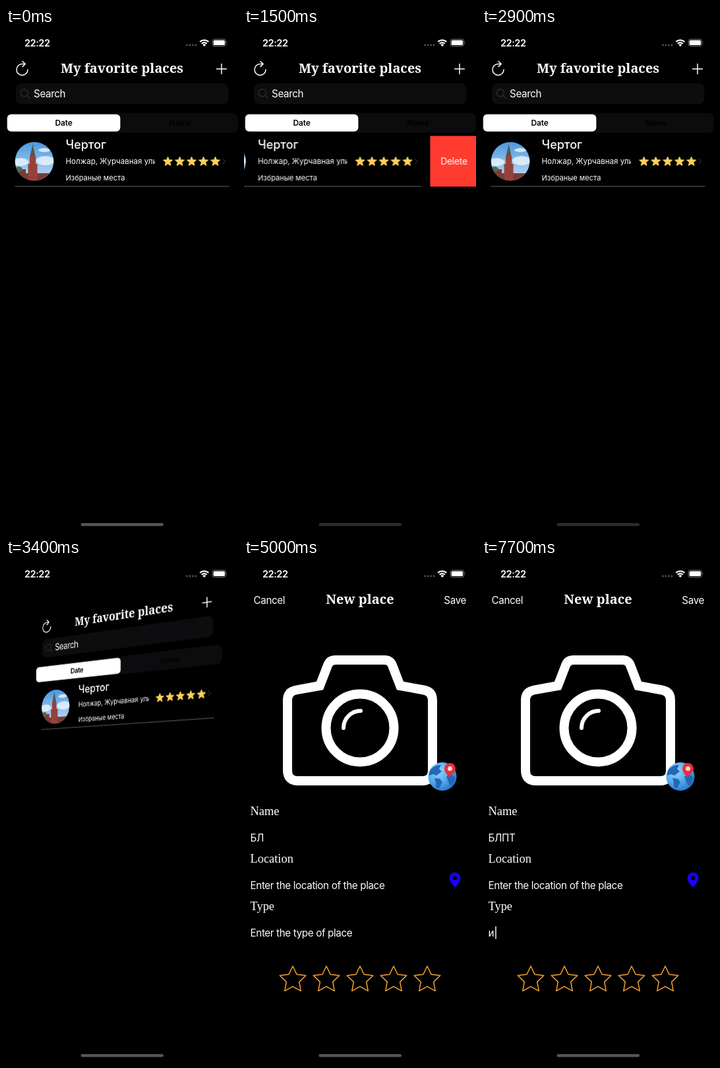
These frames come from a looping animation (352x762 px, 8000 ms). An HTML page:

```html
<!DOCTYPE html>
<html lang="en">
<head>
<meta charset="utf-8">
<title>Favorite places</title>
<style>
@property --turn { syntax: "<angle>"; inherits: true; initial-value: 0deg; }

html, body { margin: 0; width: 100%; height: 100%; overflow: hidden; background: #000; }
#stage {
  position: relative; width: 352px; height: 762px; overflow: hidden; background: #000;
  perspective: 1130px; perspective-origin: 176px 381px;
  animation: turn 8s infinite;
}
.page { position: absolute; inset: 0; }
.list {
  transform: translateZ(calc(-176px * sin(var(--turn)))) rotateY(calc(-1 * var(--turn)));
  animation: front 8s step-end infinite;
}
.form {
  transform: translateZ(calc(-176px * sin(var(--turn)))) rotateY(calc(180deg - var(--turn)));
  animation: back 8s step-end infinite;
}
svg { position: absolute; left: 0; top: 0; display: block; }

text { font: 400 15.2px Inter, "Noto Sans", sans-serif; letter-spacing: -.36px; fill: #fff; }
.end { text-anchor: end; }
.clock { font-size: 14.6px; font-weight: 600; letter-spacing: -.5px; }
.title { font: 700 20px "Noto Serif", serif; letter-spacing: 0; text-anchor: middle; }
.label { font: 400 18.4px "Liberation Serif", serif; letter-spacing: 0; }
.seg { font-size: 12px; font-weight: 600; letter-spacing: -.15px; fill: #000; text-anchor: middle; }
.place { font-size: 18px; font-weight: 500; letter-spacing: 0; }
.addr { font-size: 11.6px; letter-spacing: 0; }
.kind { font-size: 11px; letter-spacing: 0; }
.del { font-size: 14px; letter-spacing: -.3px; text-anchor: middle; }
.line { fill: none; stroke: #fff; stroke-width: 1.5; stroke-linecap: round; stroke-linejoin: round; }

.row { animation: swipe 8s infinite; }
.plus { animation: press 8s infinite; }
.home { fill: #555; animation: dim 8s infinite; }
.save { animation: enable 8s step-end infinite; }
.hint1 { animation: until4900 8s step-end infinite; }
.hint3 { animation: until7700 8s step-end infinite; }
.k1 { animation: from4900 8s step-end infinite; }
.k2 { animation: from5000 8s step-end infinite; }
.k3 { animation: from5700 8s step-end infinite; }
.k4 { animation: from6200 8s step-end infinite; }
.k5 { animation: from7700 8s step-end infinite; }
.caret { animation: caret 8s step-end infinite; }

@keyframes turn {
  0% { --turn: 0deg; }
  39.975% { --turn: 0deg; animation-timing-function: ease-in-out; }
  48.9%, 100% { --turn: 180deg; }
}
/* pages swap when the turn is edge-on */
@keyframes front { 0% { opacity: 1; } 44.4375%, 100% { opacity: 0; } }
@keyframes back { 0% { opacity: 0; } 44.4375%, 100% { opacity: 1; } }
@keyframes swipe {
  0% { transform: translateX(0); }
  10.6% { transform: translateX(0); animation-timing-function: ease-in-out; }
  18.75%, 26.5% { transform: translateX(-69.5px); animation-timing-function: ease-in-out; }
  30% { transform: translateX(7.4px); animation-timing-function: ease-out; }
  36.5%, 100% { transform: translateX(0); }
}
@keyframes press {
  0%, 36.9% { opacity: 1; }
  37.5%, 38.75% { opacity: .3; }
  41%, 100% { opacity: 1; }
}
@keyframes dim {
  0%, 12% { fill: #555; }
  16%, 38.75% { fill: #2c2c2c; }
  42%, 100% { fill: #555; }
}
@keyframes enable { 0% { fill: #6b6b6b; } 61.25%, 100% { fill: #fff; } }
@keyframes until4900 { 0% { visibility: visible; } 61.25%, 100% { visibility: hidden; } }
@keyframes until7700 { 0% { visibility: visible; } 96.25%, 100% { visibility: hidden; } }
@keyframes from4900 { 0% { visibility: hidden; } 61.25%, 100% { visibility: visible; } }
@keyframes from5000 { 0% { visibility: hidden; } 62.5%, 100% { visibility: visible; } }
@keyframes from5700 { 0% { visibility: hidden; } 71.25%, 100% { visibility: visible; } }
@keyframes from6200 { 0% { visibility: hidden; } 77.5%, 100% { visibility: visible; } }
@keyframes from7700 { 0% { visibility: hidden; } 96.25%, 100% { visibility: visible; } }
@keyframes caret {
  0% { visibility: hidden; transform: translateX(0); }
  92.5% { visibility: visible; transform: translateX(0); }
  96.25%, 100% { visibility: visible; transform: translateX(10.5px); }
}
</style>
</head>
<body>
<div id="stage">

  <div class="page list">
    <svg width="352" height="762" viewBox="0 0 352 762">
      <defs>
        <linearGradient id="sky" x2="0" y2="1">
          <stop offset="0" stop-color="#4a97e0"/><stop offset="1" stop-color="#c4e0f5"/>
        </linearGradient>
        <clipPath id="round"><circle cx="43" cy="202" r="29.3"/></clipPath>
        <clipPath id="cut"><rect x="88" y="192" width="138" height="20"/></clipPath>
      </defs>

      <path class="line" d="M33 63A8.5 8.5 0 1 1 24.5 54.5H29M25 50.5L29.2 54.5L25 58.6"/>
      <text class="title" x="176" y="68">My favorite places</text>
      <path class="line plus" d="M319.5 62H334.5M327 54.5V69.5"/>

      <rect x="15" y="83.5" width="322.5" height="32" rx="9" fill="#0d0d0f"/>
      <g fill="none" stroke="#2b2b2e" stroke-width="1.4" stroke-linecap="round">
        <circle cx="27.8" cy="98.3" r="5.6"/><path d="M32 102.5L36 106.5"/>
      </g>
      <text x="42" y="105">Search</text>

      <rect x="0" y="129" width="352" height="29.5" rx="8" fill="#0c0c0e"/>
      <rect x="1.8" y="130.8" width="171.6" height="26" rx="6" fill="#fff"/>
      <text class="seg" x="87.5" y="148">Date</text>
      <text class="seg" x="264" y="148">Name</text>

      <g class="row">
        <g clip-path="url(#round)">
          <rect x="13" y="172" width="60" height="60" fill="url(#sky)"/>
          <g fill="#eef5fb" opacity=".8">
            <ellipse cx="60" cy="201" rx="14" ry="7"/><ellipse cx="22" cy="203" rx="12" ry="6"/>
            <ellipse cx="58" cy="185" rx="9" ry="3"/>
          </g>
          <path d="M13 214H30V220H73V232H13Z" fill="#7d3a36"/>
          <ellipse cx="19" cy="214" rx="6" ry="4" fill="#4c6b4d"/>
          <path d="M33.5 232V206H36V194H45V206H47.5V232Z" fill="#97413a"/>
          <path d="M36.5 194L40.5 176L44.5 194Z" fill="#54574a"/>
        </g>
        <text class="place" x="90.5" y="183">Чертог</text>
        <g clip-path="url(#cut)"><text class="addr" x="90.5" y="206">Нолжар, Журчавная улица</text></g>
        <text class="kind" x="90.5" y="231">Избраные места</text>
        <g id="rated" fill="#ffd05a" stroke="#ffd05a" stroke-linejoin="round"></g>
        <path d="M328.7 197.8L332.8 202L328.7 206.2" fill="none" stroke="#222225" stroke-width="1.5"/>
        <rect x="13.5" y="239.3" width="325" height="1.2" fill="#555"/>
        <rect x="352" y="163.5" width="90" height="76.8" fill="#ff3b30"/>
        <text class="del" x="388" y="207">Delete</text>
      </g>
    </svg>
  </div>

  <div class="page form">
    <svg width="352" height="762" viewBox="0 0 352 762">
      <defs>
        <radialGradient id="sea" cx=".35" cy=".3" r=".8">
          <stop offset="0" stop-color="#9ad6fa"/><stop offset=".55" stop-color="#4ea8ec"/>
          <stop offset="1" stop-color="#2270c8"/>
        </radialGradient>
      </defs>

      <text x="14.5" y="67.5">Cancel</text>
      <text class="title" x="176" y="68">New place</text>
      <text class="end save" x="337" y="67.5">Save</text>

      <g fill="none" stroke="#fff" stroke-width="14">
        <path d="M66 320V214Q66 201 79 198.5L115 192L127 161Q130 153 139 153H213Q222 153 225 161L237 192L273 198.5Q286 201 286 214V320Q286 336 270 336H82Q66 336 66 320Z"/>
        <circle cx="176" cy="256" r="51.5"/>
        <path d="M151 256A26 26 0 0 1 177 230" stroke-width="6" stroke-linecap="round"/>
      </g>

      <circle cx="301" cy="329.5" r="21.5" fill="url(#sea)"/>
      <g fill="#2467b6">
        <path d="M284 318Q291 311 299 312L296 318L300 322L292 328L287 326L281 328Q281 322 284 318Z"/>
        <path d="M289 332L297 333L301 338L296 347L291 346L291 339Z"/>
        <path d="M307 329L316 327L321 331Q320 340 314 344L310 338Z"/>
      </g>
      <path d="M311 330Q304 323 304 317.5A8.4 8.4 0 0 1 321 317.5Q320 325 311 330Z" fill="#e8303a"/>
      <circle cx="312.5" cy="317.5" r="3.5" fill="#f6d5d6"/>

      <text class="label" x="9.5" y="388">Name</text>
      <text class="hint1" x="9.5" y="428">Enter the name of the place</text>
      <text x="9.5" y="428"><tspan class="k1">Б</tspan><tspan class="k2">Л</tspan><tspan class="k3">П</tspan><tspan class="k4">Т</tspan></text>

      <text class="label" x="9.5" y="460">Location</text>
      <text x="9.5" y="500">Enter the location of the place</text>
      <path d="M320 497.5Q311.5 489 311.5 483.5A8.5 8.5 0 0 1 328.5 483.5Q328.5 489 320 497.5Z" fill="#1a00ff"/>
      <circle cx="320" cy="483.3" r="3.2"/>

      <text class="label" x="9.5" y="532">Type</text>
      <text class="hint3" x="9.5" y="572">Enter the type of place</text>
      <text class="k5" x="9.5" y="572">и</text>
      <rect class="caret" x="9.3" y="556.5" width="1.8" height="19" fill="#fff"/>

      <g id="empty" fill="none" stroke="#f5a233" stroke-width="1.5" stroke-linejoin="round"></g>
    </svg>
  </div>

  <svg width="352" height="762" viewBox="0 0 352 762">
    <text class="clock" x="28" y="27.5">22:22</text>
    <g fill="#555">
      <circle cx="274.5" cy="26" r="1.4"/><circle cx="279" cy="26" r="1.4"/>
      <circle cx="283.5" cy="26" r="1.4"/><circle cx="288" cy="26" r="1.4"/>
    </g>
    <g fill="none" stroke="#fff" stroke-width="2.2">
      <path d="M294.3 20.9A9.4 9.4 0 0 1 307.3 20.9"/>
      <path d="M296.8 23.7A5.7 5.7 0 0 1 304.8 23.7"/>
    </g>
    <path d="M300.8 28L298.3 25.4A3.6 3.6 0 0 1 303.3 25.4Z" fill="#fff"/>
    <rect x="313.2" y="17" width="20.4" height="10.6" rx="3" fill="none" stroke="#777" stroke-width="1"/>
    <rect x="314.7" y="18.5" width="17.4" height="7.6" rx="1.7" fill="#fff"/>
    <path d="M334.8 20.5Q336.3 22.3 334.8 24.1Z" fill="#777"/>
    <rect class="home" x="113.5" y="750" width="125.5" height="4.6" rx="2.3"/>
  </svg>
</div>

<script>
// Five-pointed star outline around (x, y)
function star(x, y, outer, inner) {
  let d = "";
  for (let i = 0; i < 10; i++) {
    const r = i % 2 ? inner : outer, a = i * Math.PI / 5;
    d += (i ? "L" : "M") + (x + r * Math.sin(a)).toFixed(2) + " " + (y - r * Math.cos(a)).toFixed(2);
  }
  return d + "Z";
}

function fillRow(id, x, gap, y, outer, inner) {
  let html = "";
  for (let i = 0; i < 5; i++) html += `<path d="${star(x + i * gap, y, outer, inner)}"/>`;
  document.getElementById(id).innerHTML = html;
}

fillRow("rated", 245.6, 18, 202.4, 7.4, 3.3);
fillRow("empty", 74, 51, 637.5, 20.8, 10.2);
</script>
</body>
</html>
```
